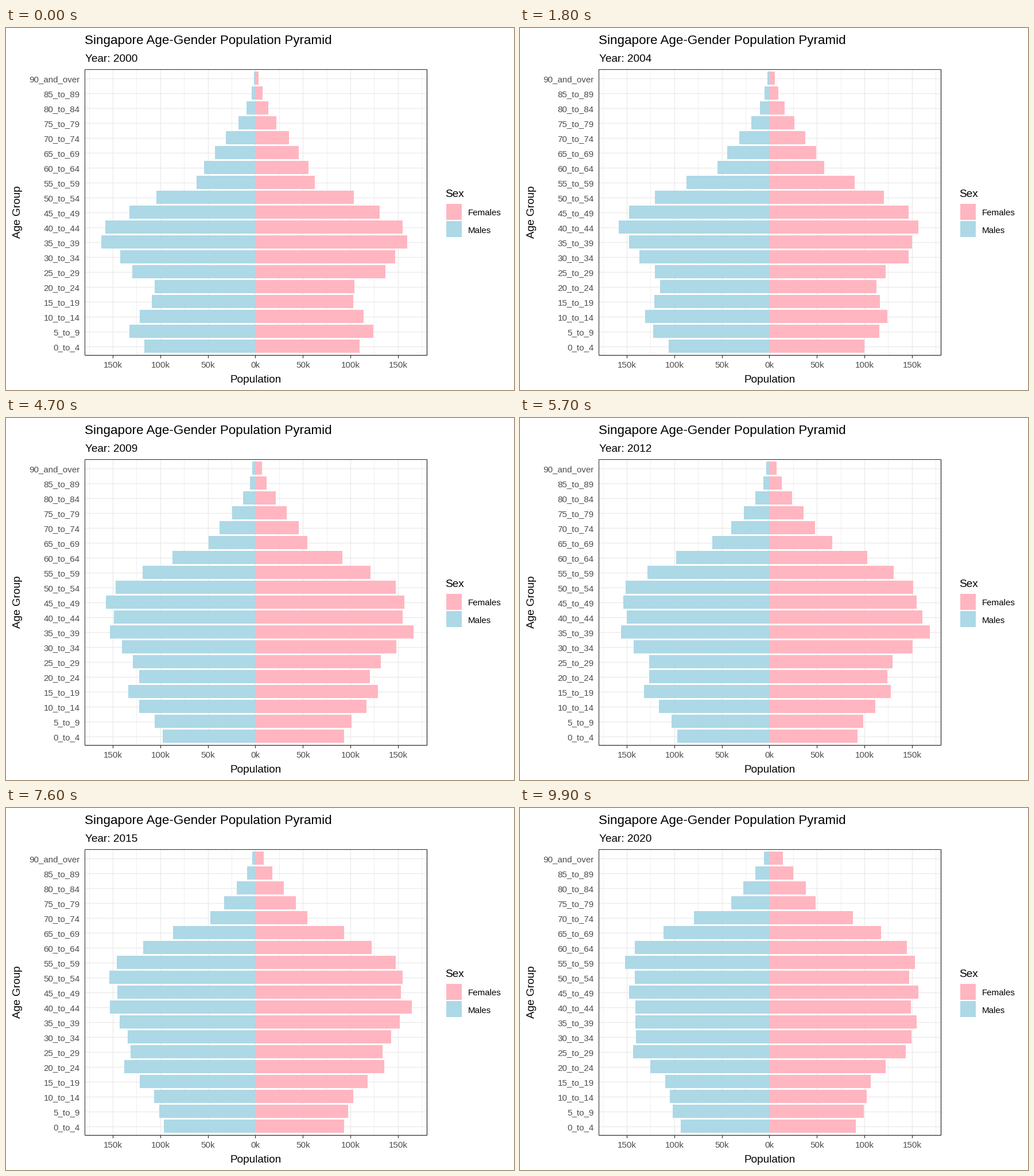
Recreate the animation shown at these times as a matplotlib script. Size 885 by 632 pixels, loop 10000 ms.

```python
import numpy as np
import matplotlib.pyplot as plt
from matplotlib.animation import FuncAnimation
from matplotlib.patches import Rectangle

W, H, DPI = 885, 632, 64
FRAMES, STEP_MS = 100, 100
X0, PX_PER_K = 434.4, 1.656          # zero line, pixels per thousand people
TOP_ROW, ROW, BAR = 87.7, 26.0, 23.4
LEFT, RIGHT, TOP, BOTTOM = 137.3, 733.4, 71.6, 571.4
PINK, BLUE = "#FFB6C1", "#ADD8E6"
GRID, DARK, LABEL = "#EBEBEB", "#333333", "#4D4D4D"

plt.rcParams["font.family"] = "Liberation Sans"

AGES = np.arange(92, 0, -5)          # middle of each age group, oldest first
GROUPS = ["90_and_over"] + [f"{a - 2}_to_{a + 2}" for a in AGES[1:]]

# Men per birth year in 2000 (thousands); later births carried backwards
BIRTHS = np.arange(1908, 2019, 5)
COHORTS = [1.2, 4.0, 9.1, 17.5, 30.8, 42.3, 54.1, 62.0, 103.9, 132.2, 157.9,
           161.8, 141.9, 129.2, 106.0, 109.0, 121.7, 132.2, 116.8, 99.3,
           90.2, 83.3, 72.7]


def bell(x, center, width):
    return np.exp(-((x - center) / width) ** 2)


def fade(x, edge, width):
    return 1 / (1 + np.exp((x - edge) / width))


def cohort_curve(u, birth, young, arrivals, peak, death, rate, cap, swing):
    """Log change of a cohort after the share u of the twenty years."""
    age = 2000 - birth
    growth = (young * fade(age, 14, 2) + 0.01 * np.maximum(-age, 0)
              + arrivals * bell(age, peak, 8)
              - np.minimum(death * np.exp(rate * age), cap))
    wave = bell(birth, 1976.5, 8) - 0.6 * bell(birth, 1987, 5)
    return u * growth + swing * np.sin(np.pi * u ** 1.2) ** 2 * wave


def population(u):
    """Men and women per age group, each cohort ageing along its own curve."""
    birth = 2000 + 20 * u - AGES
    age = 2000 - birth
    men = np.interp(birth, BIRTHS, COHORTS)
    women = men * np.exp(1.13 * np.exp(0.096 * (age - 92)) - 0.028
                         + 0.09 * bell(age, 28.5, 5.5)
                         - 0.037 * fade(age, 20, 2))
    men = men * np.exp(cohort_curve(
        u, birth, 0.07, 0.31, 20.5, 0.00233, 0.0915, 2.2, 0.145))
    women = women * np.exp(cohort_curve(
        u, birth, 0.11, 0.42, 19, 0.0017, 0.0875, 1.3, 0.18))
    return men, women


fig = plt.figure(figsize=(W / DPI, H / DPI), dpi=DPI, facecolor="white")
ax = fig.add_axes([0, 0, 1, 1])
ax.set(xlim=(0, W), ylim=(H, 0))
ax.axis("off")


def pt(px):
    return px * 72 / DPI


def line(x1, y1, x2, y2, color, width, z=1):
    ax.plot([x1, x2], [y1, y2], color=color, lw=pt(width), zorder=z,
            solid_capstyle="butt")


def text(x, y, s, px, color="black", ha="left", **kw):
    return ax.text(x, y, s, fontsize=pt(px), color=color, ha=ha,
                   va="baseline", **kw)


def box(x, y, w, h, color):
    return ax.add_patch(Rectangle((x, y), w, h, fc=color, lw=0, zorder=3))


def x_of(k):
    return X0 + k * PX_PER_K


# Grid, ticks and tick labels
for k in range(-175, 176, 50):
    line(x_of(k), TOP, x_of(k), BOTTOM, GRID, 0.8)
for k in range(-150, 151, 50):
    line(x_of(k), TOP, x_of(k), BOTTOM, GRID, 1.4)
    line(x_of(k), BOTTOM, x_of(k), BOTTOM + 4.6, DARK, 1.2)
    text(x_of(k) + 0.2, 593, f"{abs(k)}k", 15.1, LABEL, "center")

rows = TOP_ROW + ROW * np.arange(len(GROUPS))
for y, name in zip(rows, GROUPS):
    line(LEFT, y + 0.6, RIGHT, y + 0.6, GRID, 1.4)
    text(128.8, y + 6.8, name, 15.1, LABEL, "right")

# Bars
left_bars = [box(X0, y - BAR / 2, 0, BAR, BLUE) for y in rows]
right_bars = [box(X0, y - BAR / 2, 0, BAR, PINK) for y in rows]

# Panel border
line(LEFT, TOP, LEFT, BOTTOM, DARK, 1.1, 5)
line(LEFT, TOP, RIGHT, TOP, DARK, 1.1, 5)
line(RIGHT, TOP, RIGHT, BOTTOM, DARK, 1.3, 5)
line(LEFT, BOTTOM, RIGHT, BOTTOM, DARK, 1.3, 5)

# Titles and legend
text(137, 28, "Singapore Age-Gender Population Pyramid", 22.4)
year = text(137.5, 59, "", 19)
text(435, 619, "Population", 19, ha="center")
text(25.2, 321.3, "Age Group", 19, ha="center", rotation=90,
     rotation_mode="anchor")
text(765, 295, "Sex", 19)
for y, name, color in ((307, "Females", PINK), (337.4, "Males", BLUE)):
    box(766.6, y, 27.6, 27.6, color)
    text(804.6, y + 20.2, name, 15.1)


def update(i):
    u = i / (FRAMES - 1)
    men, women = population(u)
    for bar, k in zip(left_bars, men):
        bar.set_x(x_of(-k))
        bar.set_width(k * PX_PER_K)
    for bar, k in zip(right_bars, women):
        bar.set_width(k * PX_PER_K)
    year.set_text(f"Year: {2000 + round(20 * u)}")
    return [*left_bars, *right_bars, year]


anim = FuncAnimation(fig, update, frames=FRAMES, interval=STEP_MS,
                     repeat=True, repeat_delay=0, blit=False)
plt.show()
```
